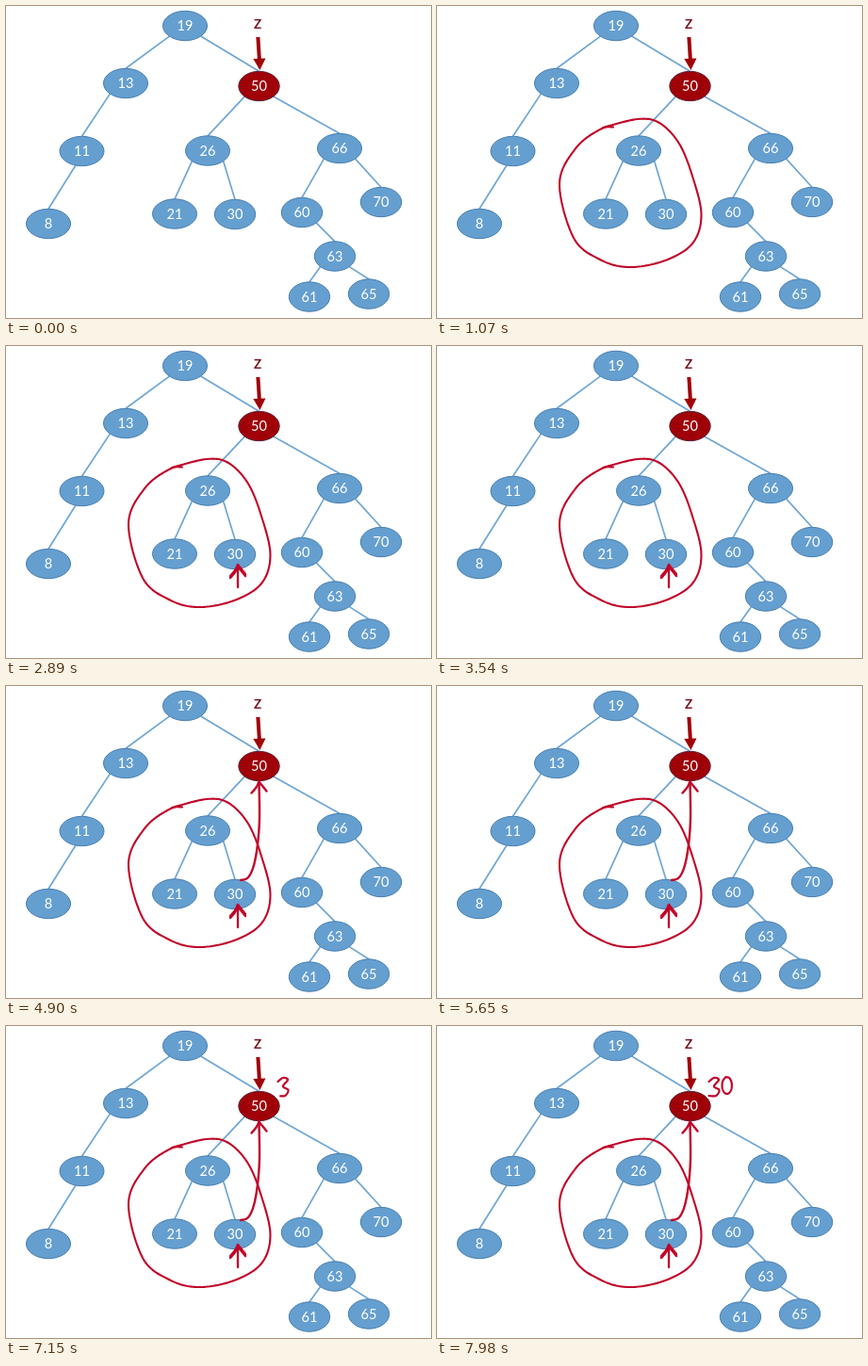
Write an HTML page with a canvas that moves like this. It is 451x331 px and loops after 8000 ms.

```html
<!DOCTYPE html>
<html lang="en">
<head>
<meta charset="utf-8">
<title>Tree with pen notes</title>
<style>
html, body { margin: 0; width: 100%; height: 100%; overflow: hidden; background: #fff; }
canvas { display: block; }
</style>
</head>
<body>
<canvas id="stage" width="451" height="331"></canvas>
<script>
const ctx = document.getElementById('stage').getContext('2d');
const LOOP = 8000;
const BLUE = '#659fd0', RIM = '#477fb0', EDGE = '#6ea6d4';
const RED = '#a00008', RED_RIM = '#58283a', INK = '#c00428';
const RY = 15.7;

const node = (value, x, y, left, right) => ({ value, x, y, left, right });

const tree =
  node(19, 190, 21,
    node(13, 127, 82,
      node(11, 80.5, 154,
        node(8, 45, 231))),
    node(50, 268.5, 85,
      node(26, 214, 153.5,
        node(21, 179, 220.5),
        node(30, 243, 221)),
      node(66, 354, 151,
        node(60, 314, 219, null,
          node(63, 349, 265.5,
            node(61, 322, 308.5),
            node(65, 385, 305.5))),
        node(70, 398, 208))));

const radius = n => n.value < 30 || n.value === 66 ? 23.5 : 21.7;

function drawEdges(n) {
  [n.left, n.right].forEach((child, i) => {
    if (!child) return;
    // Links leave the rim on a diagonal; the one to the last left leaf is steeper
    const slant = (i ? 1 : -1) * (child.value === 8 ? 0.28 : Math.SQRT1_2);
    const drop = Math.sqrt(1 - slant * slant);
    line(n.x + slant * radius(n), n.y + drop * RY, child.x, child.y - RY, EDGE, 1.7);
    drawEdges(child);
  });
}

function drawNodes(n) {
  if (!n) return;
  const marked = n.value === 50;
  ctx.beginPath();
  ctx.ellipse(n.x, n.y, radius(n), RY, 0, 0, Math.PI * 2);
  ctx.fillStyle = marked ? RED : BLUE;
  ctx.fill();
  ctx.strokeStyle = marked ? RED_RIM : RIM;
  ctx.lineWidth = 1;
  ctx.stroke();
  label(n.value, n.x, n.y + 5.2, '#fff', '14.6px Lato, sans-serif');
  drawNodes(n.left);
  drawNodes(n.right);
}

function line(x1, y1, x2, y2, color, width) {
  ctx.strokeStyle = color;
  ctx.lineWidth = width;
  ctx.beginPath();
  ctx.moveTo(x1, y1);
  ctx.lineTo(x2, y2);
  ctx.stroke();
}

function label(text, x, y, color, font) {
  ctx.font = font;
  ctx.fillStyle = color;
  ctx.fillText(text, x, y);
}

function drawPointer() {
  label('Z', 267, 23.5, '#7c1420', 'bold 13.5px Lato, sans-serif');
  line(267.4, 33, 269, 59, RED, 4);
  ctx.fillStyle = RED;
  ctx.beginPath();
  ctx.moveTo(262.3, 56);
  ctx.lineTo(275.5, 55.5);
  ctx.lineTo(269.4, 68);
  ctx.fill();
}

// Catmull-Rom point on the span b-c
const spline = (a, b, c, d, u) =>
  0.5 * (2 * b + (c - a) * u + (2 * a - 5 * b + 4 * c - d) * u * u +
    (3 * b - a - 3 * c + d) * u * u * u);

// Smooth path through a few points, with running length
function curve(pts) {
  const path = [{ x: pts[0][0], y: pts[0][1], len: 0 }];
  for (let i = 0; i < pts.length - 1; i++) {
    const b = pts[i], c = pts[i + 1];
    const a = pts[i - 1] || b, d = pts[i + 2] || c;
    for (let k = 1; k <= 12; k++) {
      const [x, y] = [0, 1].map(j => spline(a[j], b[j], c[j], d[j], k / 12));
      const last = path[path.length - 1];
      path.push({ x, y, len: last.len + Math.hypot(x - last.x, y - last.y) });
    }
  }
  return path;
}

const pen = (start, end, width, pts) => ({ start, end, width, path: curve(pts) });

// Two short barbs, left then right
const barbs = (start, x, y) => [
  pen(start, start + 120, 2.4, [[x, y], [x - 3, y + 6], [x - 8, y + 12]]),
  pen(start + 150, start + 270, 2.4, [[x, y], [x + 4, y + 5], [x + 8, y + 10]])
];

// Pen loop that begins and ends near its top
function oval(x, y, rx, ry, steps = 8) {
  return Array.from({ length: steps + 1 }, (_, i) => {
    const a = -i / steps * Math.PI * 2 - Math.PI * 0.6;
    return [x + rx * Math.cos(a), y + ry * Math.sin(a)];
  });
}

const strokes = [
  pen(60, 960, 2.1, [
    [187, 128.5], [174, 130.5], [148, 150], [130, 188], [145, 246], [173, 269],
    [204, 277], [242, 270], [271, 252], [280.5, 222], [271.5, 182],
    [257, 146], [236, 124], [213, 120], [176, 129]
  ]),
  pen(1620, 1850, 2.3, [[246, 256], [246, 235]]),
  ...barbs(1880, 246, 234),
  ...barbs(2240, 246, 232),
  pen(3700, 4400, 2.4, [
    [249, 206], [257, 203], [263, 190], [267, 168], [269, 140], [268.5, 102]
  ]),
  ...barbs(4450, 268.5, 101.5),
  pen(6700, 7180, 2.2, [
    [288.5, 59], [294, 55], [299, 57], [294, 64], [299.5, 68], [296, 74], [288.5, 74]
  ]),
  pen(7320, 7780, 2.2, oval(307.7, 63, 5.2, 9))
];

function drawStroke({ start, end, width, path }, t) {
  if (t <= start) return;
  const total = path[path.length - 1].len;
  const reach = total * Math.min(1, (t - start) / (end - start));
  ctx.strokeStyle = INK;
  ctx.lineWidth = width;
  ctx.beginPath();
  ctx.moveTo(path[0].x, path[0].y);
  for (let i = 1; i < path.length; i++) {
    const a = path[i - 1], b = path[i];
    if (a.len >= reach) break;
    const u = Math.min(1, (reach - a.len) / (b.len - a.len));
    ctx.lineTo(a.x + (b.x - a.x) * u, a.y + (b.y - a.y) * u);
  }
  ctx.stroke();
}

function draw(t) {
  ctx.fillStyle = '#fff';
  ctx.fillRect(0, 0, 451, 331);
  ctx.textAlign = 'center';
  ctx.lineCap = 'butt';
  drawEdges(tree);
  drawNodes(tree);
  drawPointer();
  ctx.lineCap = ctx.lineJoin = 'round';
  strokes.forEach(s => drawStroke(s, t));
}

const origin = performance.now();
function tick() {
  draw((performance.now() - origin) % LOOP);
  requestAnimationFrame(tick);
}
tick();
</script>
</body>
</html>
```
